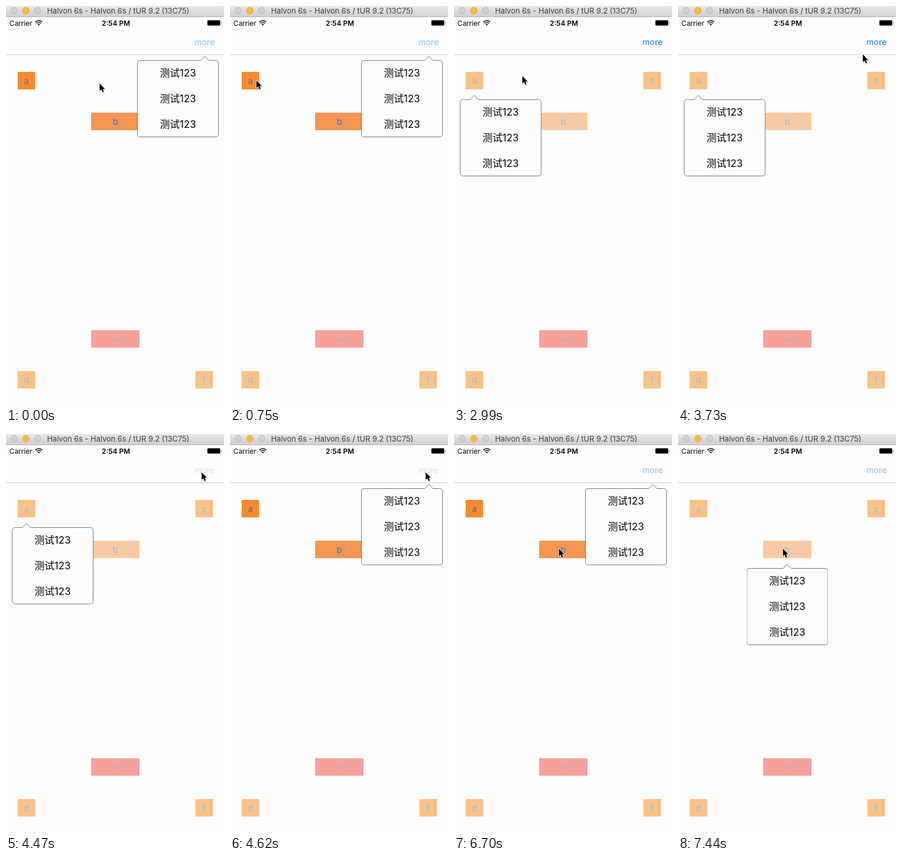
These frames come from a looping animation (374 by 686 pixels, 8 s). An HTML page:

```html
<!DOCTYPE html>
<html lang="zh">
<head>
<meta charset="utf-8">
<style>
  html, body { margin: 0; width: 100%; height: 100%; overflow: hidden; background: #fdfdfd; }
  svg { display: block; width: 374px; height: 686px; }
  text { font-family: Inter, "Noto Sans CJK SC", "Noto Sans CJK", sans-serif; text-anchor: middle; }
  .key text { font-size: 15px; fill: #9cbbd8; }
  .pop text { font-size: 17px; }
</style>
</head>
<body>
<svg viewBox="0 0 374 686">
  <defs>
    <linearGradient id="bar" x2="0" y2="1">
      <stop stop-color="#e9e7e9"/><stop offset="1" stop-color="#d1cfd1"/>
    </linearGradient>
    <clipPath id="clip"><rect id="bounds" height="686"/></clipPath>
  </defs>
  <rect width="374" height="686" fill="#fdfdfd"/>

  <!-- window title bar -->
  <rect width="374" height="18" fill="url(#bar)"/>
  <rect y="18" width="374" height="1" fill="#b4b2b4"/>
  <g fill="#d2d0d2" stroke="#b7b5b7">
    <circle cx="14" cy="8" r="5.5"/>
    <circle cx="34" cy="8" r="5.5" fill="#fdbd2f" stroke="#dfa031"/>
    <circle cx="54" cy="8" r="5.5"/>
  </g>
  <text x="192.5" y="13" font-size="13" fill="#3d3b3d">Halvon 6s - Halvon 6s / tUR 9.2 (13C75)</text>

  <!-- status bar -->
  <text x="25.5" y="34" font-size="12">Carrier</text>
  <g fill="none" stroke="#000" stroke-width="1.6">
    <path d="M50.5 27.6Q56.3 22.4 62.1 27.6M52.6 29.9Q56.3 26.6 60 29.9"/>
    <path d="M56.3 33.6L54.2 31.5Q56.3 29.8 58.4 31.5Z" fill="#000" stroke="none"/>
  </g>
  <text x="188.5" y="34" font-size="12" font-weight="600">2:54 PM</text>
  <rect x="345.5" y="24.5" width="22" height="9" rx="1.5" fill="none" stroke="#777"/>
  <rect x="346" y="25" width="21" height="8" rx="1"/>
  <path d="M369 27.3q1.8 1.7 0 3.6z"/>

  <!-- navigation bar -->
  <text id="more" x="340.7" y="66.5" font-size="14.5" fill="#0a7ff8">more</text>
  <rect y="83" width="374" height="1" fill="#c9c9c9"/>

  <g id="keys"></g>
  <path d="M183.5 572.5h8" stroke="#96b4e0" stroke-width="1.5"/>
  <g id="pop" class="pop" clip-path="url(#clip)"></g>
  <g id="cursor">
    <g transform="translate(.6 .7) scale(.92)">
      <path d="M0 0V14L3.2 11.2L5.4 16.3L7.8 15.3L5.6 10.3H9.9Z" transform="translate(.6 1.2)" stroke="#000" stroke-width="2" opacity=".18"/>
      <path d="M0 0V14L3.2 11.2L5.4 16.3L7.8 15.3L5.6 10.3H9.9Z" stroke="#fff" stroke-width="1.8" stroke-linejoin="round" paint-order="stroke"/>
    </g>
  </g>
</svg>
<script>
const $ = id => document.getElementById(id);
const PALE = '#f8c187';

function addKey(name, x, y, width, fill) {
  $('keys').insertAdjacentHTML('beforeend',
    `<g class="key" id="${name}"><rect x="${x}" y="${y}" width="${width}" height="30" fill="${fill}"/>
     <text x="${x + width / 2}" y="${y + 20.5}">${name}</text></g>`);
  const [rect, label] = $(name).children;
  return { rect, label };
}

const a = addKey('a', 20, 113, 30, PALE);
const b = addKey('b', 146, 183, 83, PALE);
addKey('c', 325, 113, 30, PALE);
addKey('d', 20, 626, 30, PALE);
const e = addKey('e', 146, 556, 83, '#f4a29a');
addKey('f', 325, 626, 30, PALE);
e.label.style.fill = '#e0a5ab';

// Speech bubble: arrow tip position and left edge of the 139 x 131 box
const bubbles = {
  more: { tip: 341, top: 86, left: 225.5 },
  a: { tip: 35, top: 153, left: 10.5 },
  b: { tip: 187.3, top: 223, left: 118 }
};

function drawBubble({ tip, top, left }) {
  const rows = [0, 1, 2].map(i =>
    `<text x="${left + 69.5}" y="${top + 35 + 44 * i}">测试123</text>`).join('');
  $('pop').innerHTML =
    `<path fill="#fdfdfd" stroke="#737373" d="M${tip} ${top + .3}L${tip + 7} ${top + 7.5}H${left + 134}
      q5 0 5 5v121q0 5 -5 5H${left + 5}q-5 0 -5 -5v-121q0 -5 5 -5H${tip - 7}Z"/>` + rows;
  // The view cuts its outline off at whole pixels
  const x = Math.floor(left);
  $('bounds').setAttribute('x', x);
  $('bounds').setAttribute('width', Math.ceil(left + 139) - x);
}

// Pointer strokes, sampled at the recording's coarse frame rate
const smooth = x => x * x * (3 - 2 * x);
const strokes = [
  { start: 150, end: 900, steps: 6, from: [160, 132], via: [95, 127], to: [36, 127], ease: smooth },
  { start: 2540, end: 3280, steps: 6, from: [36, 127], via: [106, 87], to: [217, 176], ease: x => x ** 1.7 },
  { start: 3580, end: 4020, steps: 4, from: [217, 176], via: [284, 113], to: [335, 65], ease: x => x ** .28 },
  { start: 5360, end: 5950, steps: 5, from: [335, 65], via: [262, 115], to: [200, 175], ease: smooth },
  { start: 6400, end: 6700, steps: 3, from: [200, 175], via: [188, 187], to: [179.5, 196], ease: smooth }
];

function pointerAt(t) {
  const s = strokes.findLast(s => t >= s.start);
  if (!s) return strokes[0].from;
  const step = Math.floor((t - s.start) / (s.end - s.start) * (s.steps - 1) + .01) + 1;
  const u = s.ease(Math.min(step / s.steps, 1)), v = 1 - u;
  return s.from.map((p, i) => v * v * p + 2 * u * v * s.via[i] + u * u * s.to[i]);
}

// Value of the last [time, value] pair already reached
const held = (t, pairs) => pairs.findLast(([at]) => t >= at)[1];

let shown;
function frame() {
  const t = performance.now() % 8000;
  const open = held(t, [[0, 'more'], [1500, 'a'], [4620, 'more'], [7290, 'b']]);
  if (open !== shown) {
    shown = open;
    drawBubble(bubbles[open]);
    const dark = open === 'more';
    a.rect.setAttribute('fill', dark ? '#f48a2f' : PALE);
    b.rect.setAttribute('fill', dark ? '#f49552' : '#f9c9a5');
    a.label.style.fill = dark ? '#3b78bd' : '';
    b.label.style.fill = dark ? '#1c7df0' : '#8cbdf4';
  }
  a.label.style.opacity = held(t, [[0, 1], [1500, 0], [1650, .6], [1800, 1]]);
  b.label.style.opacity = held(t, [[0, 1], [7290, .2], [7440, 1]]);
  $('more').style.opacity = held(t, [[0, .5], [1500, 1], [4470, .2], [4760, .35], [4910, .5]]);
  $('cursor').setAttribute('transform', `translate(${pointerAt(t)})`);
  requestAnimationFrame(frame);
}
frame();
</script>
</body>
</html>
```
